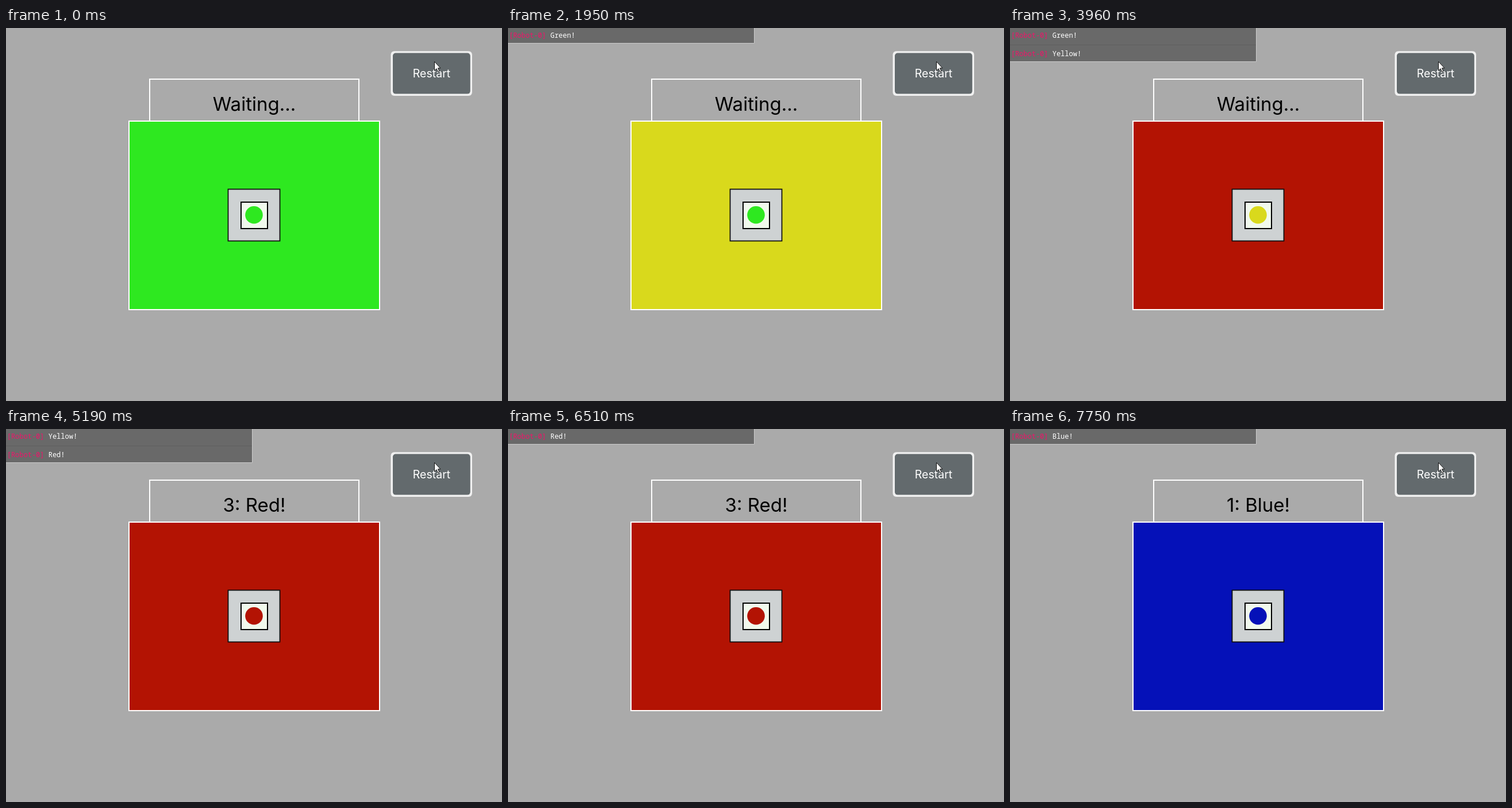
Animation, 863 px wide and 649 px high, one loop 8 s. Source, as an HTML page:

```html
<!DOCTYPE html>
<html lang="en">
<head>
<meta charset="utf-8">
<title>Colour robot</title>
<style>
html, body { margin: 0; width: 100%; height: 100%; overflow: hidden; background: #aaa; }
svg { display: block; width: 863px; height: 649px; }
.ui { font-family: Inter, Roboto, sans-serif; text-anchor: middle; }
.log { font: 12px "Noto Sans Mono", "DejaVu Sans Mono", monospace; fill: #fff; white-space: pre; }
.log .who { fill: #f0146a; }
</style>
</head>
<body>
<svg viewBox="0 0 863 649">
  <rect width="863" height="649" fill="#aaa"/>

  <g id="log" class="log">
    <path id="logBox" fill="#696969" stroke="#c9c9c9"/>
    <path id="divider" d="M0 29.5H428" stroke="#5e5e5e"/>
    <text id="row0" x="1.7" y="17"><tspan class="who">[Robot-0]</tspan><tspan></tspan></text>
    <text id="row1" x="1.7" y="49"><tspan class="who">[Robot-0]</tspan><tspan></tspan></text>
  </g>

  <rect x="250" y="89" width="364" height="100" fill="none" stroke="#fff" stroke-width="2"/>
  <text id="title" class="ui" x="432" y="143.5" font-size="33"></text>

  <rect id="floor" x="214" y="162" width="436" height="328" stroke="#fff" stroke-width="2"/>
  <rect x="386.5" y="280.5" width="90" height="90" fill="#ced2d3" stroke="#111" stroke-width="1.8"/>
  <rect x="409" y="303" width="46" height="46" fill="#f1f9ed" stroke="#000" stroke-width="2"/>
  <circle id="sensor" cx="431.5" cy="325.3" r="15.3"/>

  <rect id="rim" x="669.5" y="40.3" width="141.5" height="77.7" rx="6"/>
  <rect id="face" x="673" y="43.6" width="134.8" height="71" rx="5"/>
  <text class="ui" x="740.5" y="86" font-size="19.5" fill="#fff">Restart</text>
  <path d="M745.5 58.5V74L749 70.7L751.6 76.4L754 75.3L751.5 69.8H756Z" fill="#fff" stroke="#111" stroke-width="1"/>
</svg>
<script>
const LOOP = 8000;
const COLORS = { Green: '#2ee820', Yellow: '#d9d91c', Red: '#b31303', Blue: '#0511b8' };

// Each track lists [start time, value]; a value holds until the next start.
const floorTrack = [[0, 'Green'], [1950, 'Yellow'], [3960, 'Red'], [6580, 'Blue']];
const sensorTrack = [[0, 'Green'], [1980, 'Yellow'], [3990, 'Red'], [6580, 'Blue']];
const titleTrack = [
  [0, 'Waiting...'], [1180, '1: Green!'],
  [1950, 'Waiting...'], [3190, '2: Yellow!'],
  [3960, 'Waiting...'], [5190, '3: Red!'],
  [6580, 'Waiting...'], [7750, '1: Blue!']
];
const pressTrack = [[0, 0], [6410, 1], [6440, 2], [6510, 0]];
const faces = ['#636a6d', '#5a6164', '#51585b'];
const rims = ['#f0f0f0', '#e6e6e6', '#dcdcdc'];

// Messages: [shown at, hidden at, word]
const messages = [
  [1180, 4190, 'Green'], [3190, 6210, 'Yellow'],
  [5190, 6580, 'Red'], [7750, LOOP, 'Blue']
];

const $ = id => document.getElementById(id);
const at = (track, t) => track.filter(([start]) => start <= t).pop()[1];
const set = (id, name, value) => $(id).setAttribute(name, value);
const show = (id, on) => set(id, 'visibility', on ? 'visible' : 'hidden');

function draw(t) {
  set('floor', 'fill', COLORS[at(floorTrack, t)]);
  set('sensor', 'fill', COLORS[at(sensorTrack, t)]);
  $('title').textContent = at(titleTrack, t);

  const press = at(pressTrack, t);
  set('face', 'fill', faces[press]);
  set('rim', 'fill', rims[press]);

  const rows = messages.filter(([from, to]) => t >= from && t < to);
  const bottom = rows.length > 1 ? 58.5 : 26.5;
  set('logBox', 'd', `M-2 -2H428.5V${bottom}H-2Z`);
  show('logBox', rows.length > 0);
  show('divider', rows.length > 1);
  for (let i = 0; i < 2; i++) {
    show('row' + i, i < rows.length);
    $('row' + i).lastChild.textContent = rows[i] ? ` ${rows[i][2]}!` : '';
  }
}

const begin = performance.now();
function tick() {
  draw((performance.now() - begin) % LOOP);
  requestAnimationFrame(tick);
}
tick();
</script>
</body>
</html>
```
